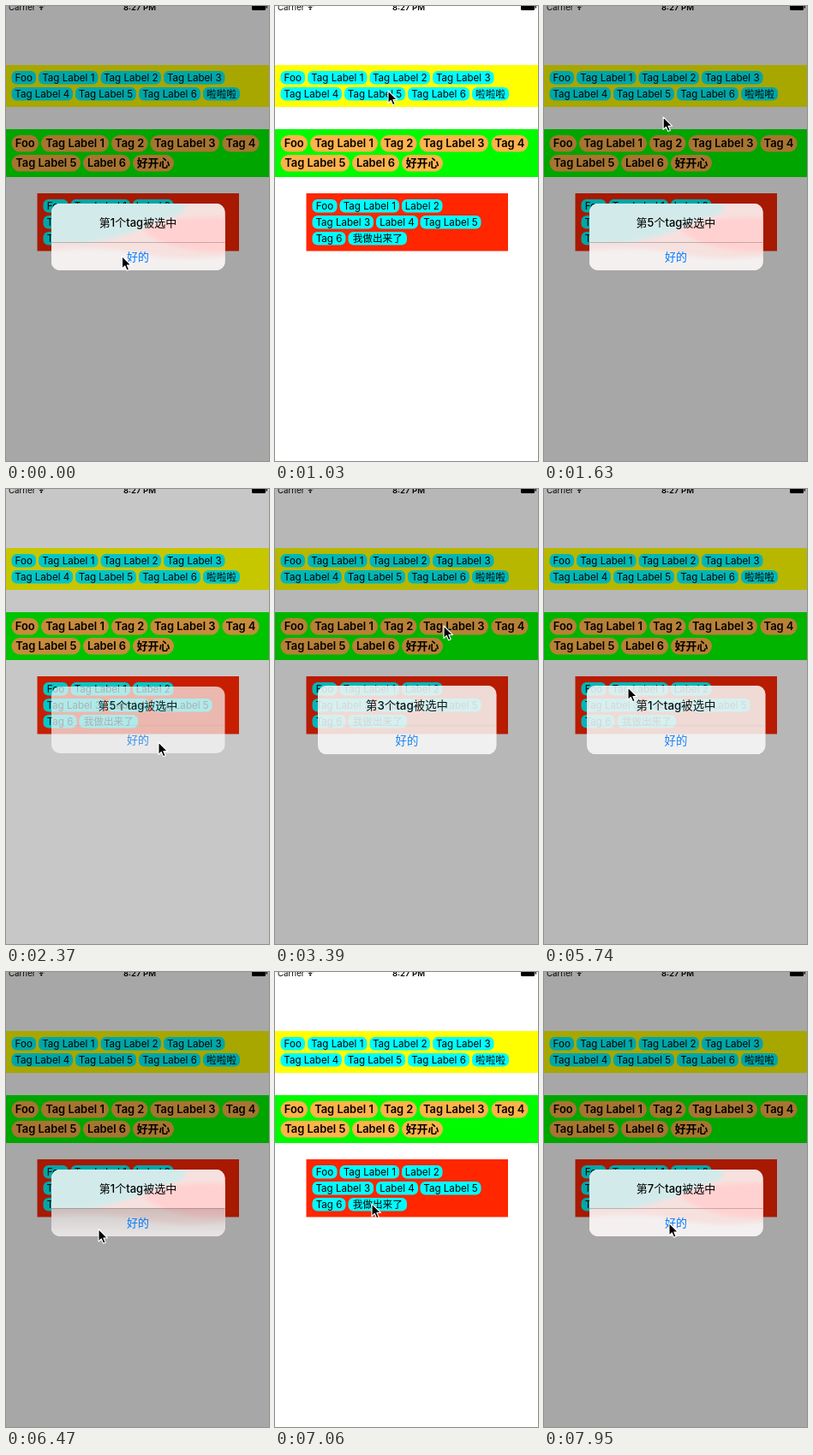
An HTML page that plays this animation: 307x532 px, repeating every 8 s.

```html
<!DOCTYPE html>
<html lang="zh-CN">
<head>
<meta charset="utf-8">
<title>Tag labels</title>
<style>
  html, body { margin: 0; width: 100%; height: 100%; overflow: hidden; background: #fff; }
  svg { display: block; width: 100vw; height: 100vh; }
  text { font-family: Inter, "Noto Sans CJK SC", "Noto Sans CJK", sans-serif; text-anchor: middle; }
  .status { font-size: 9.6px; }
  .title { font-size: 13px; font-weight: 500; }
</style>
</head>
<body>
<svg viewBox="0 0 307 532">
  <defs>
    <clipPath id="panel"><rect x="53" y="231" width="202.5" height="78" rx="10"/></clipPath>
    <filter id="soft"><feGaussianBlur stdDeviation="2"/></filter>
    <linearGradient id="shade" x2="0" y2="1">
      <stop stop-opacity=".16"/><stop offset="1" stop-opacity=".05"/>
    </linearGradient>
  </defs>

  <g id="page"></g>

  <g class="status">
    <text x="3" y="5" style="text-anchor:start">Carrier</text>
    <text x="156" y="5" font-weight="600">8:27 PM</text>
    <path d="M37.5 0Q41 -2.5 45 0M39.2 1.8Q41.2 .4 43.2 1.8" fill="none" stroke="#000" stroke-width="1.2"/>
    <circle cx="41.2" cy="3.6" r="1.1"/>
    <rect x="287" y="-3" width="16" height="8" rx="1.5"/>
    <rect x="303.7" y="0" width="1.3" height="2.5"/>
  </g>

  <rect id="dim" width="307" height="532"/>

  <g id="alert">
    <g clip-path="url(#panel)">
      <rect x="53" y="231" width="203" height="78" fill="#fafafa"/>
      <g id="tint">
        <rect x="53" y="231" width="203" height="78" fill="#f6e1df"/>
        <g filter="url(#soft)">
          <path d="M43 221H200Q226 243 180 250Q150 268 95 277H43Z" fill="#d2ebea"/>
          <path d="M159 262Q185 244 265 247V287Q190 290 159 262Z" fill="#ffd2d1"/>
          <path d="M43 287Q110 280 160 290T265 291V319H43Z" fill="#f4f0f0"/>
        </g>
      </g>
      <rect id="pressed" x="53" y="276" width="203" height="33" fill="url(#shade)"/>
      <path id="divider" d="M53 276.5H256" stroke="#8c7474" stroke-opacity=".6" stroke-width=".8"/>
    </g>
    <text id="message" class="title" x="154" y="258"></text>
    <text x="154" y="298" font-size="13" fill="#007aff">好的</text>
  </g>

  <path id="cursor" d="M0 0V14.6L3.3 11.5 5.6 16.8 8.2 15.7 5.9 10.5H10.5Z" stroke="#fff" stroke-width="1.1" stroke-linejoin="round"/>
</svg>
<script>
const $ = id => document.getElementById(id);
const LOOP = 8000, STEP = 147.2;

function add(tag, attrs, content = "") {
  const el = document.createElementNS("http://www.w3.org/2000/svg", tag);
  for (const name in attrs) el.setAttribute(name, attrs[name]);
  el.textContent = content;
  $("page").append(el);
}

function band(x, y, width, height, fill) {
  add("rect", { x, y, width, height, fill });
}

// Each tag is [label, left, right].
function row(y, style, tags) {
  for (const [label, left, right] of tags) {
    add("rect", { x: left, y, width: right - left, height: style.height, rx: style.radius, fill: style.fill });
    add("text", {
      x: (left + right) / 2, y: y + style.height / 2 + style.size * 0.36,
      "font-size": style.size, "font-weight": style.weight
    }, label);
  }
}

const small = { height: 15.5, radius: 6, fill: "#00fdff", size: 11.6, weight: 400 };
const large = { height: 19.5, radius: 9.7, fill: "#ffb34b", size: 12.9, weight: 600 };

band(0, 69, 307, 49, "#ffff00");
row(76, small, [["Foo", 6.5, 35], ["Tag Label 1", 38, 107.5], ["Tag Label 2", 110.5, 181], ["Tag Label 3", 184, 255.5]]);
row(95, small, [["Tag Label 4", 6.5, 78], ["Tag Label 5", 81, 152], ["Tag Label 6", 155, 227], ["啦啦啦", 230, 273]]);

band(0, 144, 307, 56, "#00fb00");
row(151, large, [["Foo", 6.5, 38], ["Tag Label 1", 41, 120], ["Tag 2", 123, 165.5], ["Tag Label 3", 168.5, 249], ["Tag 4", 252.5, 295.5]]);
row(174, large, [["Tag Label 5", 6.5, 87], ["Label 6", 90, 145], ["好开心", 148, 196]]);

band(36.5, 219, 235.5, 67.5, "#ff2600");
row(226, small, [["Foo", 43.5, 72.5], ["Tag Label 1", 75.5, 145], ["Label 2", 148, 195.5]]);
row(245, small, [["Tag Label 3", 43.5, 115], ["Label 4", 118, 167], ["Tag Label 5", 169.5, 240.5]]);
row(264, small, [["Tag 6", 43.5, 82.5], ["我做出来了", 85.5, 154]]);

const alerts = [
  { tag: 1, show: -5, press: 2, hide: 3 },
  { tag: 5, show: 9, press: 15, hide: 16 },
  { tag: 3, show: 23, press: 28, hide: 29 },
  { tag: 1, show: 39, press: 44, hide: 45 },
  { tag: 7, show: 50, press: 98, hide: 99 }
];

// [step, x, y]
const cursorPath = [
  [0, 135.5, 292.5], [3, 135.5, 292.5], [7, 132, 99], [10, 132, 99],
  [14, 178, 296], [16, 178, 296], [20, 197, 160], [23, 197, 160],
  [27, 163, 296], [29, 161, 294], [33, 117, 187.5], [34, 117, 187.5],
  [37, 98, 232], [39, 98, 232], [43, 108, 300.5], [45, 108, 300.5],
  [48, 113, 271], [50, 113, 271], [53, 146, 293.5], [55, 146, 293.5]
];

function cursorAt(step) {
  const next = Math.max(1, cursorPath.findIndex(point => point[0] > step));
  const [s0, x0, y0] = cursorPath[next - 1], [s1, x1, y1] = cursorPath[next];
  const u = (step - s0) / (s1 - s0), ease = u * u * (3 - 2 * u);
  return [x0 + (x1 - x0) * ease, y0 + (y1 - y0) * ease];
}

function drawAlert(step) {
  const alert = alerts.find(a => step >= a.show && step <= a.hide);
  $("alert").style.display = alert ? "" : "none";
  $("dim").setAttribute("opacity", 0);
  if (!alert) return;

  const entering = step === alert.show, leaving = step === alert.hide;
  const settled = !entering && !leaving;
  const scale = entering ? 1.03 : 1;
  $("dim").setAttribute("opacity", entering ? 0.282 : leaving ? 0.22 : 0.345);
  $("alert").setAttribute("opacity", entering ? 0.86 : leaving ? 0.7 : 1);
  $("alert").setAttribute("transform", `translate(154 270) scale(${scale}) translate(-154 -270)`);
  $("tint").setAttribute("opacity", settled ? 1 : 0);
  $("divider").setAttribute("opacity", settled ? 1 : 0.2);
  $("pressed").setAttribute("opacity", step === alert.press ? 1 : 0);
  $("message").textContent = `第${alert.tag}个tag被选中`;
}

function frame(now) {
  const step = Math.min(54, Math.floor((now % LOOP + 6) / STEP));
  drawAlert(step);
  $("cursor").setAttribute("transform", `translate(${cursorAt(step)})`);
  requestAnimationFrame(frame);
}
frame(0);
</script>
</body>
</html>
```
